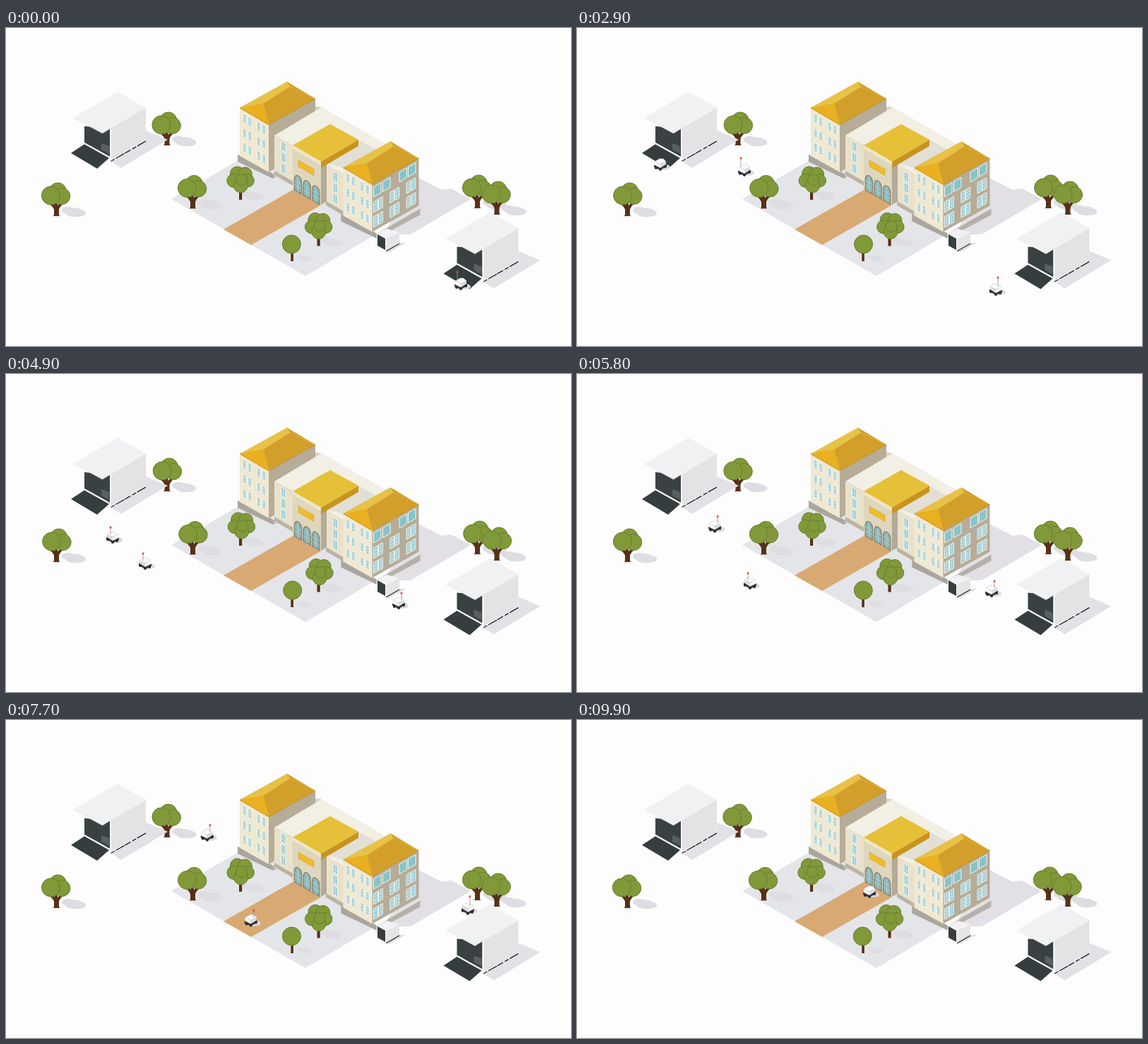
Write an HTML page that moves like this. It is 800 by 450 pixels and loops after 10 s.

```html
<!DOCTYPE html>
<html lang="en">
<head>
<meta charset="utf-8">
<title>Campus robots</title>
<style>
  html, body { margin: 0; width: 100%; height: 100%; overflow: hidden; background: #fefdfe; }
  svg { display: block; width: 800px; height: 450px; }
</style>
</head>
<body>
<svg id="stage" viewBox="0 0 800 450"></svg>
<script>
const NS = 'http://www.w3.org/2000/svg';
const stage = document.getElementById('stage');
const SLOPE = 0.575;
const LOOP = 10000, STEP = 100;

function add(parent, tag, attrs = {}) {
  const el = document.createElementNS(NS, tag);
  for (const k in attrs) el.setAttribute(k, attrs[k]);
  parent.appendChild(el);
  return el;
}
const group = (parent, x = 0, y = 0) => add(parent, 'g', { transform: `translate(${x} ${y})` });
const poly = (g, points, fill, more) => add(g, 'polygon', { points, fill, ...more });
const path = (g, d, stroke, width, more) =>
  add(g, 'path', { d, stroke, 'stroke-width': width, fill: 'none', ...more });
const disc = (g, cx, cy, rx, fill, ry = rx, more) => add(g, 'ellipse', { cx, cy, rx, ry, fill, ...more });

// Upright wall piece whose top and bottom run along an isometric axis
function panel(g, x, y, w, h, fill, dir = 1, more) {
  const d = w * SLOPE * dir;
  return poly(g, `${x},${y} ${x + w},${y + d} ${x + w},${y + d + h} ${x},${y + h}`, fill, more);
}

function pane(g, x, y, w, h, dir, bars = 2, glass = '#94cbd9') {
  panel(g, x, y, w, h, glass, dir, { stroke: '#f8f6ea', 'stroke-width': 1 });
  for (let i = 1; i <= bars; i++) {
    const yy = y + h * i / (bars + 1);
    path(g, `M${x} ${yy}l${w} ${w * SLOPE * dir}`, '#e4eeec', 0.7);
  }
  if (bars) path(g, `M${x + w / 2} ${y + w * SLOPE * dir / 2}v${h}`, '#e4eeec', 0.6);
}

// ---- Ground ----
const ground = group(stage);
poly(ground, '234,242 331,186 420,190 522,293 424,351', '#e4e5e9');
poly(ground, '308,285 408,228 447,250 347,307', '#d8a973');
poly(ground, '580,210 617,229 630,227 658,242 573,292 535,292', '#e2e0e4');

// ---- Trees ----
const crowns = [];
const LEAF = { stroke: '#687f2d', 'stroke-width': 1 };

function crown(g, discs) {
  const c = add(g, 'g');
  discs.forEach(([x, y, r]) => disc(c, x, y, r, '#819939', r, LEAF));
  crowns.push(c);
}
function shade(g, x, y, s = 1) {
  disc(g, x, y, 13 * s, '#dedde1', 6.5 * s);
  disc(g, x - 9 * s, y - 3 * s, 9 * s, '#dedde1', 5 * s);
  disc(g, x + 7 * s, y + 1 * s, 9 * s, '#dedde1', 5 * s);
}
function forkTree(x, y) {
  const g = group(stage, x, y);
  shade(g, 26, -5);
  disc(g, 0, 0, 6, '#ecebee', 2.5);
  path(g, 'M-9 -19Q-1 -14 0 -6M9 -19Q2 -14 1 -6M0 -18V-4', '#583016', 4);
  poly(g, '-3,-10 4,-10 4,-2 5,0 -4,0 -3,-2', '#583016');
  crown(g, [[3, -35, 12], [9, -28, 11.5], [-7, -29, 13]]);
}
function roundTree(x, y) {
  const g = group(stage, x, y);
  shade(g, 19, -5, 0.88);
  add(g, 'rect', { x: -2, y: -16, width: 4.2, height: 16, fill: '#583016' });
  crown(g, [[-4, -37, 10], [7, -36, 10], [-9, -27, 9.5], [11, -27, 9], [1, -20, 10], [2, -28, 8]]);
}
[[71, 266], [227.5, 166], [264, 255.5], [667, 255], [694.5, 264]].forEach(p => forkTree(...p));
[[332, 243], [442.5, 308.5]].forEach(p => roundTree(...p));

const small = group(stage, 405, 330);
shade(small, 18, -4, 0.62);
add(small, 'rect', { x: -1.7, y: -13, width: 3.6, height: 13, fill: '#583016' });
crown(small, [[0, -24, 13]]);

const back = add(stage, 'g');

// ---- Building ----
function wing(g) {
  poly(g, '328,179 378,207 440,171 440,180 378,213 328,189', '#b5b1aa');
  poly(g, '328,179 378,206 378,213 328,189', '#aaa69f');
  poly(g, '331,113 372,137 372,204 331,181', '#f0e8d0');
  poly(g, '372,137 438,100 438,167 372,204', '#b6ac98');
  for (let row = 0; row < 3; row++)
    for (const dx of [0, 7.5, 20, 27.5])
      pane(g, 335.5 + dx, 121 + dx * SLOPE + row * 20.5, 4.5, 12, 1);
  poly(g, '331,113 398,76 438,100 372,137', '#d2a02a');
  poly(g, '331,113 398,76 402,83 364,107', '#e8c247');
  poly(g, '331,113 364,107 372,137', '#eab01f');
  path(g, 'M331 113L372 137L438 100', '#c18f20', 1);
  path(g, 'M372 137L364 107L402 83L438 100', '#dfb53e', 0.8);
}
const hall = group(stage);
wing(hall);

// Middle block
poly(hall, '380,152 447,112 548,170 478,207', '#f2efe4');
poly(hall, '438,111 447,112 384,150 380,152 438,118', '#d9d3c4');
poly(hall, '499,158 524,172 478,198 456,192 499,167', '#e2dfd6');
panel(hall, 380, 152, 27, 57, '#e9e1ca');
panel(hall, 453, 192, 25, 57, '#e9e1ca');
panel(hall, 453, 245, 25, 6, '#b9b3a5');
panel(hall, 380, 202, 27, 6, '#b9b3a5');
for (let row = 0; row < 3; row++) {
  pane(hall, 389.5, 160 + row * 15.5, 6.5, 12, 1);
  pane(hall, 463, 203 + row * 15.5, 6.5, 12, 1);
}
panel(hall, 446, 194, 8, 56, '#b3aa97', -1);
panel(hall, 406, 167, 40, 61, '#dfd6be');
panel(hall, 414, 187, 22, 9, '#edbd2c', 1, { stroke: '#d3a233', 'stroke-width': 0.6 });
for (let i = 0; i < 3; i++) {
  const x = 408.5 + i * 12.6, y = 214 + i * 7.2;
  add(hall, 'path', {
    d: `M${x} ${y + 15}V${y}Q${x + 1} ${y - 8} ${x + 6} ${y - 4}Q${x + 10} ${y - 1} ${x + 10} ${y + 6}V${y + 21}Z`,
    fill: '#87b8bd', stroke: '#91866f', 'stroke-width': 1.6
  });
  path(hall, `M${x + 5} ${y - 4}V${y + 18}M${x} ${y + 2}l10 5.7M${x} ${y + 8}l10 5.7`, '#c4d8d3', 0.7);
}
poly(hall, '446,189 499,158 499,167 446,198', '#c8941f');
poly(hall, '406,166 459,136 499,158 446,189', '#e6c038');
poly(hall, '406,166 446,189 446,194 406,171', '#efe6c8');

const right = group(hall, 146.5, 84.5);
wing(right);
for (const [x, y] of [[520.5, 225], [533.5, 217.5], [557, 204], [569.5, 196.5]])
  pane(hall, x, y, 10.5, 14, -1, 0, '#86c4cb');
for (const y of [246, 267])
  for (let i = 0; i < 3; i++)
    for (const dx of [0, 7])
      pane(hall, 520.5 + i * 23.3 + dx, y - (i * 23.3 + dx) * SLOPE, 5.8, 15, -1);

// ---- Containers ----
function container(x, y) {
  const g = group(stage, x, y);
  poly(g, '148,188 198,158 198,145 229,158 163,198', '#e2e1e5');
  poly(g, '109,139 148,150 148,187 109,165', '#fbfbfc');
  poly(g, '111,139 147,142 147,182 111,162', '#3a4142');
  poly(g, '135,163 146,167 146,178 135,172', '#596061');
  poly(g, '92,177 111,164.5 146,184 129,199', '#363d3e');
  poly(g, '148,142 198,113 198,158 148,187', '#e3e2e5');
  path(g, 'M148 142V187', '#fbfbfc', 2);
  path(g, 'M148.5 188.5L198 160', '#252829', 1.4, { 'stroke-dasharray': '6 2 14 1 9 3' });
  poly(g, '95.5,127 158,90 198,113 148,142 136.5,149', '#f0f1f3');
  path(g, 'M95.5 127L136.5 149L148 142', '#e4e5e8', 0.7);
}
container(0, 0);
container(527.5, 170.5);

const box = group(stage, 525, 284);
poly(box, '13,32 32,20 41,20 18,33', '#dfdee2');
poly(box, '0,7 13,14 13,32 0,25', '#f6f6f7');
poly(box, '1,8 12,14 12,30 1,24', '#373e3f');
poly(box, '13,14 32,5 32,21 13,32', '#e5e4e7');
poly(box, '0,7 14,0 32,5 13,14', '#f2f2f4');
path(box, 'M13 32L32 21', '#2a2d2e', 1.2);

const front = add(stage, 'g');

// ---- Robots ----
function makeRobot(keys, inFront, shown, flagged) {
  const el = add(back, 'g');
  disc(el, 6, 4, 8, '#dbdade', 4);
  const body = add(el, 'g');
  poly(body, '-9,1 1,-4 9,0 9,3 0,8 -9,4', '#3a3d3f');
  [[-6, 5], [0, 7], [7, 3]].forEach(([x, y]) => disc(body, x, y, 2.1, '#2a2c2e'));
  poly(body, '-8,-4 0,0 0,5 -8,1', '#ffffff');
  poly(body, '0,0 8,-4 8,0 0,5', '#dcdde0');
  poly(body, '-8,-4 -1,-8 4,-8 8,-4 0,0', '#fafafb', { stroke: '#c8c9cc', 'stroke-width': 0.6, 'stroke-linejoin': 'round' });
  const flag = add(el, 'g');
  const mast = path(flag, '', '#9a9a9c', 0.8);
  const cloth = poly(flag, '', '#dc5034');
  return { el, body, flag, mast, cloth, keys, inFront, shown, flagged };
}

// Each key is [time, x, y]
const robots = [
  makeRobot([[2300, 138, 182], [2900, 118, 193], [3400, 102, 202], [4900, 151, 231], [5080, 160, 236],
    [6700, 239, 190], [8600, 326, 138], [9700, 375, 110]],
    t => t < 4000, t => t >= 2300, t => t > 3100),
  makeRobot([[0, 391, 112], [1400, 317, 155], [2900, 237, 201], [4245, 159, 246], [4900, 197, 268],
    [6550, 285, 319], [6700, 293, 314], [8600, 395, 256], [9300, 414, 243]],
    t => t > 5000, () => true, t => t < 9400),
  makeRobot([[1400, 644, 362], [2400, 610, 381], [2900, 593, 370], [4400, 537, 336], [4900, 556, 324],
    [6700, 618, 290], [7650, 656, 268], [8600, 616, 246], [9900, 566, 217]],
    t => t < 5000, () => true, () => true)
];

function pose(keys, t) {
  let i = 0;
  while (i < keys.length - 2 && t >= keys[i + 1][0]) i++;
  const [t0, x0, y0] = keys[i], [t1, x1, y1] = keys[i + 1];
  const k = Math.min(1, Math.max(0, (t - t0) / (t1 - t0)));
  return { x: x0 + (x1 - x0) * k, y: y0 + (y1 - y0) * k, east: x1 > x0, south: y1 > y0 };
}

function flagTip(p) {
  if (p.east) return p.south ? [-3, -14] : [4, -14];
  return p.south ? [-5, -17] : [3, -17];
}

function drawRobot(r, t) {
  const p = pose(r.keys, t);
  const layer = r.inFront(t) ? front : back;
  if (r.el.parentNode !== layer) layer.appendChild(r.el);
  r.el.setAttribute('visibility', r.shown(t) ? 'visible' : 'hidden');
  r.el.setAttribute('transform', `translate(${p.x.toFixed(2)} ${p.y.toFixed(2)})`);
  r.body.setAttribute('transform', p.east === p.south ? 'scale(-1 1)' : '');
  r.flag.setAttribute('display', r.flagged(t) ? 'inline' : 'none');
  const [fx, fy] = flagTip(p);
  r.mast.setAttribute('d', `M${fx} -4V${fy}`);
  r.cloth.setAttribute('points', `${fx - 1.5},${fy - 1} ${fx + 1.5},${fy - 1.5} ${fx + 1},${fy + 2} ${fx - 1},${fy + 1.5}`);
}

function frame(now) {
  const t = Math.floor(now % LOOP / STEP) * STEP;
  const sway = 0.8 * Math.sin((t - 1500) / LOOP * 2 * Math.PI);
  crowns.forEach(c => c.setAttribute('transform', `translate(${sway.toFixed(2)} 0)`));
  robots.forEach(r => drawRobot(r, t));
  requestAnimationFrame(() => frame(performance.now()));
}
frame(performance.now());
</script>
</body>
</html>
```
